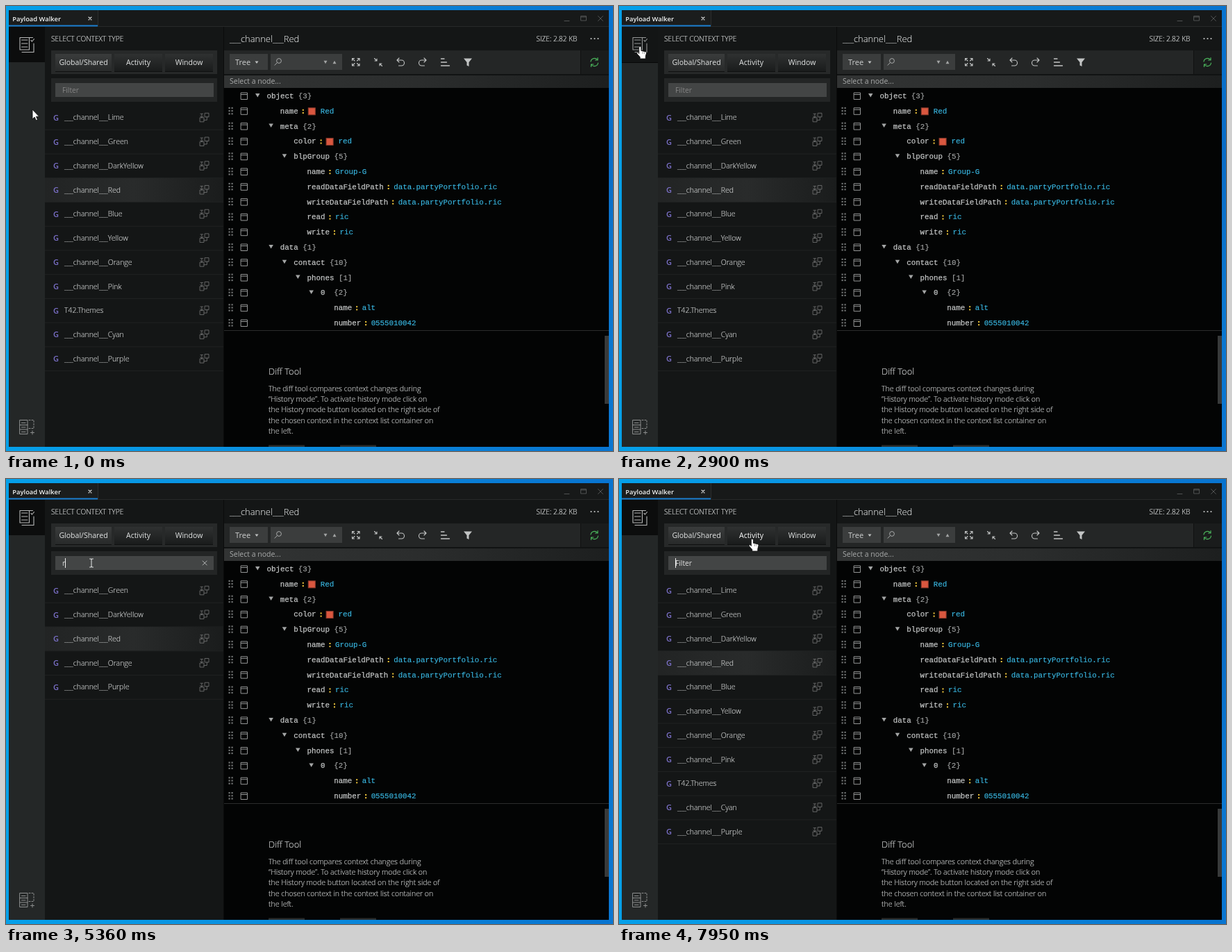
Animation, 874 px wide and 641 px high, one loop 8000 ms. Source, as an HTML page:

```html
<!DOCTYPE html>
<html lang="en">
<head>
<meta charset="utf-8">
<title>Payload Walker</title>
<style>
  html, body { margin: 0; width: 100%; height: 100%; overflow: hidden; background: #0b8fdc; }
  svg { display: block; width: 874px; height: 641px; }
  text { font-family: "Open Sans", "Noto Sans", sans-serif; white-space: pre; }
  .mono { font-family: "Liberation Mono", "Noto Sans Mono", monospace; font-size: 10.8px; }
  .line { fill: none; stroke-linecap: round; stroke-linejoin: round; }
</style>
</head>
<body>
<svg id="stage" viewBox="0 0 874 641" xmlns="http://www.w3.org/2000/svg"></svg>
<script>
const LOOP = 8000;
const SHIFT = -253.5;
const ROW = 34.73;
const CHAR = 6.48;

const rect = (x, y, w, h, fill, more = '') =>
  `<rect x="${x}" y="${y}" width="${w}" height="${h}" fill="${fill}" ${more}/>`;
const text = (x, y, s, size, fill, more = '') =>
  `<text x="${x}" y="${y}" font-size="${size}" fill="${fill}" ${more}>${s}</text>`;
const thin = (x, y, s, size, fill) =>
  text(x, y, s, size, fill, `font-weight="300" stroke="${fill}" stroke-width="0.15"`);
const line = (d, stroke, w = 1, more = '') =>
  `<path class="line" d="${d}" stroke="${stroke}" stroke-width="${w}" ${more}/>`;
const shape = (d, fill, more = '') => `<path d="${d}" fill="${fill}" ${more}/>`;
const group = (id, body) => `<g id="${id}">${body}</g>`;
const grad = (id, dir, ...stops) =>
  `<linearGradient id="${id}" x1="0" y1="0" x2="${dir === 'h' ? 1 : 0}" y2="${dir === 'h' ? 0 : 1}">` +
  stops.map((c, i) => `<stop offset="${i / (stops.length - 1)}" stop-color="${c}"/>`).join('') +
  '</linearGradient>';
const middle = 'text-anchor="middle"';

const defs = '<defs>' +
  grad('edge', 'h', '#05a0ea', '#0a93e2', '#0a82d8', '#0874d0') +
  grad('side', 'v', '#0874d0', '#0a6cc6', '#0c78d0', '#0a76d2') +
  grad('button', 'v', '#2f3131', '#1a1c1c') +
  grad('pressed', 'v', '#3a3c3c', '#282a2a') +
  grad('picked', 'h', '#222424', '#292b2b', '#1a1c1c') +
  grad('node', 'h', '#323434', '#2b2d2d', '#1d1f1f') +
  '</defs>';

// Context list
const NAMES = ['Lime', 'Green', 'DarkYellow', 'Red', 'Blue', 'Yellow', 'Orange', 'Pink', 'T42.Themes', 'Cyan', 'Purple']
  .map(n => n.includes('.') ? n : '___channel___' + n);

const linkIcon = line('M286.5 -6.5h5.5v5.5h-5.5zM279.5 0h5.5v6h-5.5zM289.3 -1v4.5h-4.3M281.8 0v-5M279.8 -2.2l2 2 2 -2M280 -5.5h3.5', '#767878', 0.8);

const listRow = (name, i) => group('row' + i,
  (name.endsWith('_Red') ? rect(56, -17.2, 257, 34.4, 'url(#picked)') : '') +
  rect(56, 17, 257, 1, '#202222') +
  text(68, 4, 'G', 11, '#7b70c9', 'font-weight="600"') +
  thin(84, 3.6, name, 10.45, '#d2d4d4') + linkIcon);

const button = (x, w, label, fill, id) =>
  rect(x, 69, w, 25, fill) + rect(x, 94, w, 1, '#0f1010') +
  text(x + w / 2, 84.8, label, 10.55, '#e2e4e4', middle + (id ? ` id="${id}"` : ''));

const leftPanel = group('left',
  thin(65, 50.8, 'SELECT CONTEXT TYPE', 10.2, '#dcdede') +
  rect(65, 64, 239, 34, '#272929') +
  button(71, 81, 'Global/Shared', 'url(#pressed)') +
  button(156, 69, 'Activity', 'url(#button)', 'activity') +
  button(229, 69, 'Window', 'url(#button)') +
  rect(65, 104, 239, 34, '#232525') +
  rect(71, 111, 228, 20, '#434545') +
  text(81, 124.8, 'Filter', 10.2, '#858787', 'id="hint"') +
  text(81, 124.8, '', 10.3, '#dcdede', 'id="typed"') +
  rect(81, 114, 1, 14, '#f0f0f0', 'id="caret"') +
  line('M283.2 118l6 6m0 -6l-6 6', '#b4b6b6', 1, 'id="clear"') +
  NAMES.map(listRow).join(''));

// Tree: [depth, key, value or count, swatch]
const TREE = [
  [0, 'object', ' {3}'], [1, 'name', 'Red', 1], [1, 'meta', ' {2}'], [2, 'color', 'red', 1],
  [2, 'blpGroup', ' {5}'], [3, 'name', 'Group-G'], [3, 'readDataFieldPath', 'data.partyPortfolio.ric'],
  [3, 'writeDataFieldPath', 'data.partyPortfolio.ric'], [3, 'read', 'ric'], [3, 'write', 'ric'],
  [1, 'data', ' {1}'], [2, 'contact', ' {10}'], [3, 'phones', ' [1]'], [4, '0', '  {2}'],
  [5, 'name', 'alt'], [5, 'number', '0555010042']
];
const mono = (x, y, s, fill, weight = 0.2) =>
  `<text class="mono" x="${x}" y="${y}" fill="${fill}" stroke="${fill}" stroke-width="${weight}">${s}</text>`;

function treeRow([depth, key, value, swatch], i) {
  const y = 129.5 + 21.8 * i, x = 375.5 + 19.35 * depth, end = x + key.length * CHAR, base = y + 3.5;
  let out = line(`M338.5 ${y - 4.5}h9v9.5h-9zM338.5 ${y - 2}h9`, '#949696');
  if (i) for (let k = 0; k < 6; k++)
    out += rect(320.5 + (k % 2) * 4, y - 5.5 + (k >> 1) * 4.2, 2.2, 2.2, '#707272');
  out += mono(x, base, key, '#c4c6c6', 0.25);
  if (value[0] === ' ')
    return out + shape(`M${x - 16.5} ${y - 3.5}h6.5l-3.25 5.5z`, '#a4a6a6') + mono(end, base, value, '#aaacac', 0.1);
  out += rect(end + 6, y - 2.5, 2, 2, '#f2c83c') + rect(end + 6, y + 1.7, 2, 2, '#f2c83c');
  if (swatch) out += rect(end + 14.5, y - 4.5, 10, 10, '#d9573f', 'stroke="#8c3a2c"');
  return out + mono(end + (swatch ? 32 : 14.5), base, value, '#38b4de');
}

const DIFF = ['The diff tool compares context changes during',
  '“History mode”. To activate history mode click on',
  'the History mode button located on the right side of',
  'the chosen context in the context list container on', 'the left.'];

const tool = '#c2c4c4';
const tools =
  line('M502 79l-3.5 -3.5m0 3v-3h3M505.5 79l3.5 -3.5m-3 0h3v3M502 82.5l-3.5 3.5m0 -3v3h3M505.5 82.5l3.5 3.5m0 -3v3h-3', tool, 1.1) +
  line('M530.5 75.5l3.5 3.5m0 -3v3h-3M541.5 86.5l-3.5 -3.5m0 3v-3h3', tool, 1.1) +
  line('M566 75l-3 3 3 3M563.5 78h6a4 4 0 0 1 0 8h-4', tool, 1.1) +
  line('M602 75l3 3 -3 3M604.5 78h-6a4 4 0 0 0 0 8h4', tool, 1.1) +
  line('M626.5 76h4.5M626.5 81h8M626.5 86h12', tool, 1.3) +
  shape('M659 75.5h12l-4.5 5.5v6l-3 -1.5v-4.5z', tool);

const rightPanel = group('right',
  rect(314, 30, 900, 34, '#141616') +
  rect(314, 64, 900, 34, '#242626') + rect(314, 98, 900, 2, '#111313') +
  rect(314, 100, 554, 18, 'url(#node)', 'id="nodeBar"') +
  rect(314, 118, 900, 520, '#030404') + rect(314, 467, 900, 1, '#2b2d2d') +
  rect(313, 30, 1, 610, '#0a0b0b') +
  thin(322, 51.5, '___channel___Red', 12.95, '#d8dada') +
  rect(322, 69, 55, 23, '#3b3d3d') + text(330, 84.8, 'Tree', 11, '#cfd1d1') +
  shape('M358.5 79.5h5l-2.5 3.5z', '#c0c2c2') +
  rect(381, 69, 103, 23, '#3b3d3d') +
  '<circle cx="393" cy="79" r="3.4" fill="none" stroke="#a6a8a8"/>' + line('M390.5 81.5l-3.5 3.7', '#a6a8a8') +
  shape('M457.5 78.8h5l-2.5 4.5zM470.5 83.3h5l-2.5 -4.5z', '#a2a4a4') + tools +
  text(322, 112.3, 'Select a node...', 10.5, '#a8aaaa') +
  TREE.map(treeRow).join('') +
  thin(378, 531, 'Diff Tool', 12.95, '#d2d4d4') +
  DIFF.map((s, i) => thin(378, 554.7 + 15.3 * i, s, 10.55, '#d0d2d2')).join('') +
  rect(378, 632.5, 52, 4, '#2b2d2d') + rect(481, 632.5, 52, 4, '#2b2d2d'));

const fixedRight =
  thin(763.5, 50.6, 'SIZE: 2.82 KB', 10.1, '#e0e2e2') +
  [842.5, 847.5, 852.5].map(x => `<circle cx="${x}" cy="47" r="1.1" fill="#c4c6c6"/>`).join('') +
  rect(827, 64, 41, 34, '#1a1c1c') + rect(827, 64, 1, 34, '#101111') +
  line('M842 80a5.3 5.3 0 0 1 9.5 -2.5M852 74.5v3.5h-3.5M852.5 82a5.3 5.3 0 0 1 -9.5 2.5M842.5 87.5v-3.5h3.5', '#4bb45c', 1.2) +
  rect(862, 475, 6, 98, '#383a3a');

const sidebar =
  rect(4, 30, 52, 606, '#242727') +
  rect(4, 30, 52, 51, '#0c0d0d') +
  group('hover', rect(4, 30, 52, 51, '#131515') + rect(4, 81, 52, 1, '#060707')) +
  group('menu', line('M20 45.5h13.5v17.5h-13.5zM22.5 49h8.5M22.5 54h8.5M22.5 59h8.5M33.5 45.5h5M40 54v12.5h-17M36 49.5l1.5 1.5 3 -3.5', '#e2e4e4', 1.1)) +
  line('M20 596.5h11v20h-11zM22.5 600.5h5.5M20 603.5h11M22.5 606.8h5.5M20 610h11M22.5 613.5h5.5', '#8c8e8e') +
  line('M33 596.5h7v12h-7', '#8c8e8e', 1, 'stroke-dasharray="2 2"') +
  line('M38 612v5M35.5 614.5h5', '#8c8e8e');

const frame =
  rect(4, 6, 864, 24, '#171919') + rect(4, 6, 128, 22, '#1b1d1d') +
  rect(4, 27.5, 128, 2, '#1c80d2') + rect(132, 6, 1, 23, '#2b2d2d') + rect(132, 29, 736, 1, '#272929') +
  text(9.3, 21.6, 'Payload Walker', 9.4, '#f2f4f4', 'font-weight="600"') +
  line('M119 16l4 4m0 -4l-4 4', '#dcdede', 1.1) +
  line('M804 21.5h7M828 14.5h7.5v6.5h-7.5zM828 16h7.5M852.5 14.5l7 7m0 -7l-7 7', '#515353') +
  rect(0, 0, 874, 6, 'url(#edge)') + rect(0, 635, 874, 6, 'url(#edge)') +
  rect(0, 0, 4, 641, '#06a0e8') + rect(868, 0, 6, 641, 'url(#side)');

const pointer = 'stroke="#111" stroke-width="0.9" stroke-linejoin="round"';
const cursors =
  group('arrow', shape('M0 0V14L3.2 11.1L5.3 15.8L7.5 14.8L5.5 10.3H9.7Z', '#fff', pointer)) +
  group('hand', shape('M-1.7 1.2C-1.7 -.6 1.4 -.6 1.4 1.2V5.8L7.4 7.2C8.7 7.6 9 8.4 9 9.5L7.8 14V17.5H-.3V15L-4.6 10.2C-5.2 8.7 -3.8 7.6 -2.8 8.6L-1.7 10Z', '#fff', pointer) +
    line('M3.5 7.5v2.5M6 8v2', '#555', 0.6)) +
  group('beam', line('M-2.5 -6h1.5l1 1 1 -1h1.5M0 -5V5M-2.5 6h1.5l1 -1 1 1h1.5', '#d8dada', 1.1));

const stage = document.getElementById('stage');
stage.innerHTML = defs + rect(4, 30, 864, 605, '#141616') + leftPanel + rightPanel + fixedRight + sidebar + frame + cursors;
const $ = id => document.getElementById(id);
const show = (id, on) => $(id).setAttribute('display', on ? 'inline' : 'none');

// Motion
const ease = {
  both: k => k * k * (3 - 2 * k),
  in: k => k * k,
  out: k => 1 - (1 - k) * (1 - k)
};
const PATH = [ // time, x, y, easing towards this point
  [0, 38, 149], [500, 38, 149], [1200, 30.5, 58.5, 'both'], [3670, 30.5, 58.5],
  [3940, 33, 84.5, 'in'], [4460, 123, 121, 'out'], [7610, 123, 121], [7950, 192, 86.5, 'both'], [LOOP, 192, 86.5]
];
const TYPING = [[0, ''], [5330, 'r'], [5480, 're'], [5600, 'red'], [6510, 're'], [6670, 'r'], [6890, '']];
const CARET = [[4590, 4930], [5330, 5980], [6340, 6700], [7080, 7440], [7800, LOOP]];

const ramp = (t, a, b) => Math.min(1, Math.max(0, (t - a) / (b - a)));
const typedAt = t => TYPING.filter(s => s[0] <= t).pop()[1];

function pointerAt(t) {
  const i = Math.max(1, PATH.findIndex(p => p[0] > t));
  const a = PATH[i - 1], b = PATH[i];
  const k = ease[b[3] || 'both'](ramp(t, a[0], b[0]));
  return [a[1] + (b[1] - a[1]) * k, a[2] + (b[2] - a[2]) * k];
}

function drawPointer(t) {
  const [x, y] = pointerAt(t);
  const onMenu = x < 56 && y < 81;
  const onActivity = x > 156 && x < 225 && y > 69 && y < 95;
  const onField = x > 71 && x < 299 && y > 111 && y < 131;
  const kind = onMenu || onActivity ? 'hand' : onField ? 'beam' : 'arrow';
  for (const id of ['arrow', 'hand', 'beam']) show(id, id === kind);
  $(kind).setAttribute('transform', `translate(${x} ${y})`);
  $('activity').setAttribute('fill', onActivity ? '#ffffff' : '#e2e4e4');
}

function drawList(t) {
  const word = typedAt(t);
  const query = t < 5360 ? '' : word;
  let n = 0;
  NAMES.forEach((name, i) => {
    const on = name.toLowerCase().includes(query);
    show('row' + i, on);
    if (on) $('row' + i).setAttribute('transform', `translate(0 ${160.8 + ROW * n++})`);
  });
  const typed = $('typed');
  if (typed.textContent !== word) typed.textContent = word;
  show('hint', !word);
  show('clear', word);
  show('caret', CARET.some(([a, b]) => t >= a && t < b));
  $('caret').setAttribute('x', Math.round(81 + (word ? typed.getComputedTextLength() : 0)));
  const g = Math.round(133 + 95 * ramp(t, 4560, 4650));
  $('hint').setAttribute('fill', `rgb(${g},${g},${g})`);
}

function draw(t) {
  const closed = t >= 1500 && t < 2800;
  show('left', !closed);
  $('right').setAttribute('transform', `translate(${closed ? SHIFT : 0} 0)`);
  $('nodeBar').setAttribute('width', closed ? 554 - SHIFT : 554);
  const hover = ramp(t, 980, 1200) - ramp(t, 3900, 4150);
  const dim = ramp(t, 1630, 1810) - ramp(t, 2860, 3080);
  $('menu').setAttribute('opacity', 0.8 + 0.2 * hover - 0.45 * dim);
  $('hover').setAttribute('opacity', hover);
  drawList(t);
  drawPointer(t);
}

function tick() {
  draw(performance.now() % LOOP);
  requestAnimationFrame(tick);
}
tick();
</script>
</body>
</html>
```
